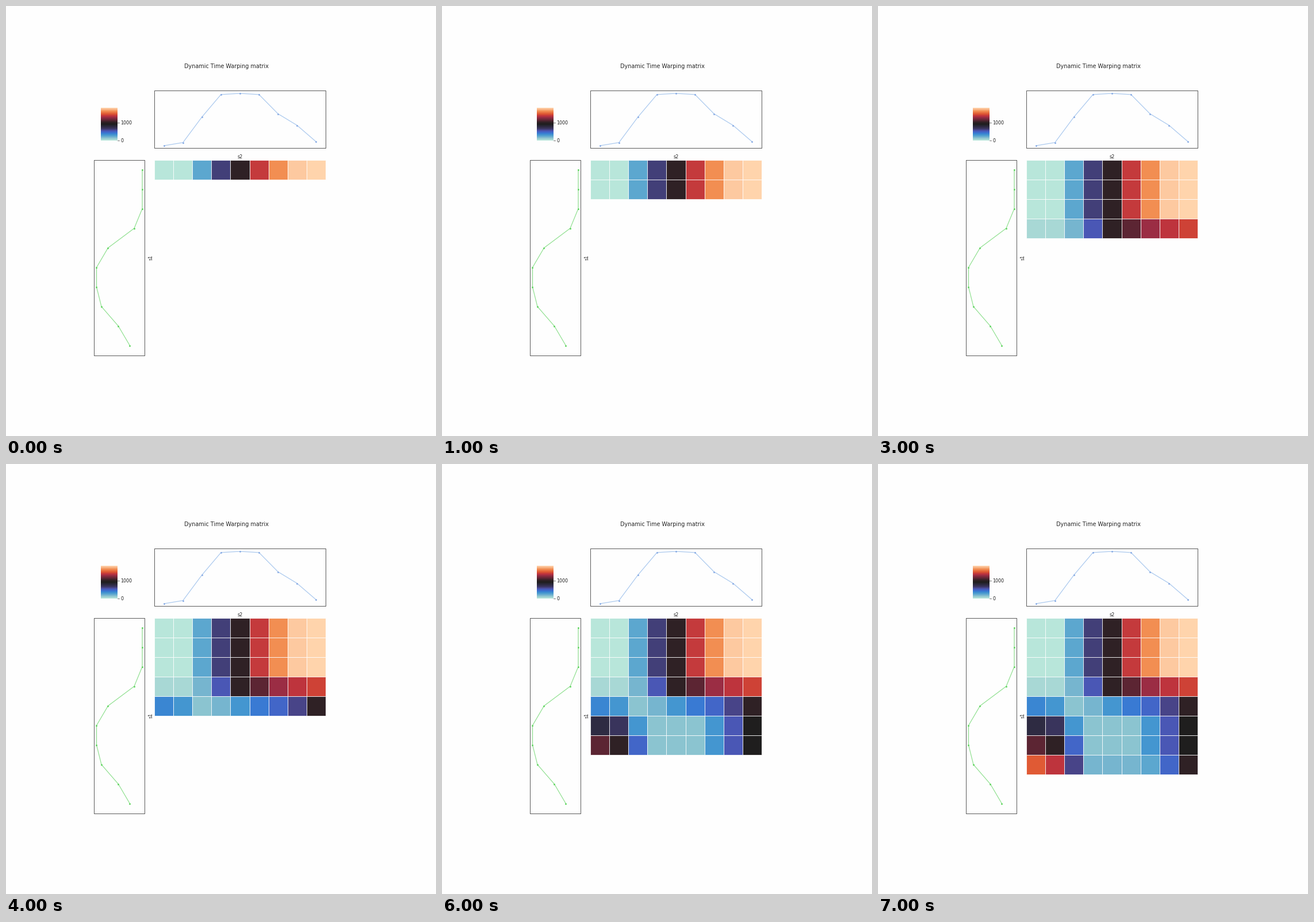
Animation of 748 by 748 pixels, one loop 8 s. Source, as a matplotlib script:

```python
import numpy as np
import matplotlib.pyplot as plt
from matplotlib.animation import FuncAnimation
from matplotlib.colors import LinearSegmentedColormap
from matplotlib.patches import Rectangle

SIZE, DPI = 748, 64
PX = 72 / DPI  # points per pixel
INK = "#262626"

# Cold-to-hot scale: position on the scale and colour, keyed by letter.
SCALE = {
    "a": (0.00, "#b8e6da"), "b": (0.03, "#a8d8d5"), "c": (0.07, "#8bc4d0"),
    "d": (0.10, "#76b5cf"), "e": (0.13, "#5ca7cf"), "f": (0.17, "#4496d0"),
    "g": (0.20, "#3a86d2"), "h": (0.22, "#397ad3"), "i": (0.26, "#4266c8"),
    "j": (0.29, "#4a57b5"), "k": (0.33, "#484488"), "l": (0.34, "#423f78"),
    "m": (0.37, "#39345c"), "n": (0.42, "#2e2b42"), "o": (0.50, "#1f1e1e"),
    "p": (0.56, "#2f2125"), "q": (0.62, "#5c2533"), "r": (0.71, "#9b2d44"),
    "s": (0.75, "#be343d"), "t": (0.77, "#c43a3c"), "u": (0.78, "#ce4236"),
    "v": (0.82, "#e05a34"), "w": (0.90, "#f28e52"), "x": (0.98, "#fdc9a0"),
    "y": (1.00, "#ffd4ac"),
}
ROWS = ["aaelptwxy"] * 3 + ["bbdjpqrsu", "gfcdfhikp", "nmfcccfjo",
                            "qpicccfjo", "vskdddeip"]

S2_Y = [243, 237.5, 193, 154, 152, 154, 187.5, 207.5, 236]
S1_X = [237, 237, 237, 223, 177.5, 157.5, 157.5, 166, 195.5, 215.5]
LEFT, TOP, CELL_W, CELL_H = 258.2, 267.6, 33.07, 34.03
RIGHT, BOTTOM = LEFT + 9 * CELL_W, TOP + 10 * CELL_H

fig = plt.figure(figsize=(SIZE / DPI, SIZE / DPI), dpi=DPI, facecolor="#fefefe")
ax = fig.add_axes([0, 0, 1, 1])
ax.axis("off")


def label(x, y, text, size=8, **kw):
    kw = {"ha": "center", "va": "baseline", "color": INK, **kw}
    ax.text(x, y, text, fontsize=size * PX, family="DejaVu Sans", **kw)


def frame(x0, y0, x1, y1):
    ax.add_patch(Rectangle((x0, y0), x1 - x0, y1 - y0, fill=False,
                           ec="black", lw=0.64 * PX))


def series(x, y, line, dot):
    ax.plot(x, y, color=line, lw=1.2 * PX)
    ax.plot(x, y, "o", color=dot, ms=3 * PX, mew=0)


def colorbar():
    cmap = LinearSegmentedColormap.from_list("icefire", list(SCALE.values()))
    ax.imshow(np.linspace(1, 0, 256)[:, None], cmap=cmap, aspect="auto",
              extent=(165, 194, 234, 177), interpolation="bilinear")
    for y, text in ((234, "0"), (203, "1000")):
        ax.plot([194, 197], [y, y], color=INK, lw=0.64 * PX)
        label(199.5, y + 3, text, ha="left")


def cell(row, col, key):
    box = Rectangle((LEFT + col * CELL_W, TOP + row * CELL_H), CELL_W, CELL_H,
                    fc=SCALE[key][1], ec="white", lw=0.8 * PX, snap=True)
    return ax.add_patch(box)


colorbar()
ax.set(xlim=(0, SIZE), ylim=(SIZE, 0))
label(383.5, 108, "Dynamic Time Warping matrix", 9.6)
label(407.5, 264.8, "s2")
label(251.8, 437.8, "s1", rotation=90, va="center")
frame(LEFT, 147.4, RIGHT, 247.4)
frame(153.4, TOP, 241.2, BOTTOM)
series(LEFT + CELL_W * (np.arange(9) + 0.5), S2_Y, "#a9c8ee", "#8fb0e6")
series(S1_X, TOP + CELL_H * (np.arange(10) + 0.5), "#90e090", "#68d868")
matrix = [[cell(r, c, key) for c, key in enumerate(keys)]
          for r, keys in enumerate(ROWS)]


def update(step):
    for r, boxes in enumerate(matrix):
        for box in boxes:
            box.set_visible(r <= step)
    return sum(matrix, [])


anim = FuncAnimation(fig, update, frames=len(ROWS), interval=1000,
                     repeat=True, repeat_delay=0)
plt.show()
```
